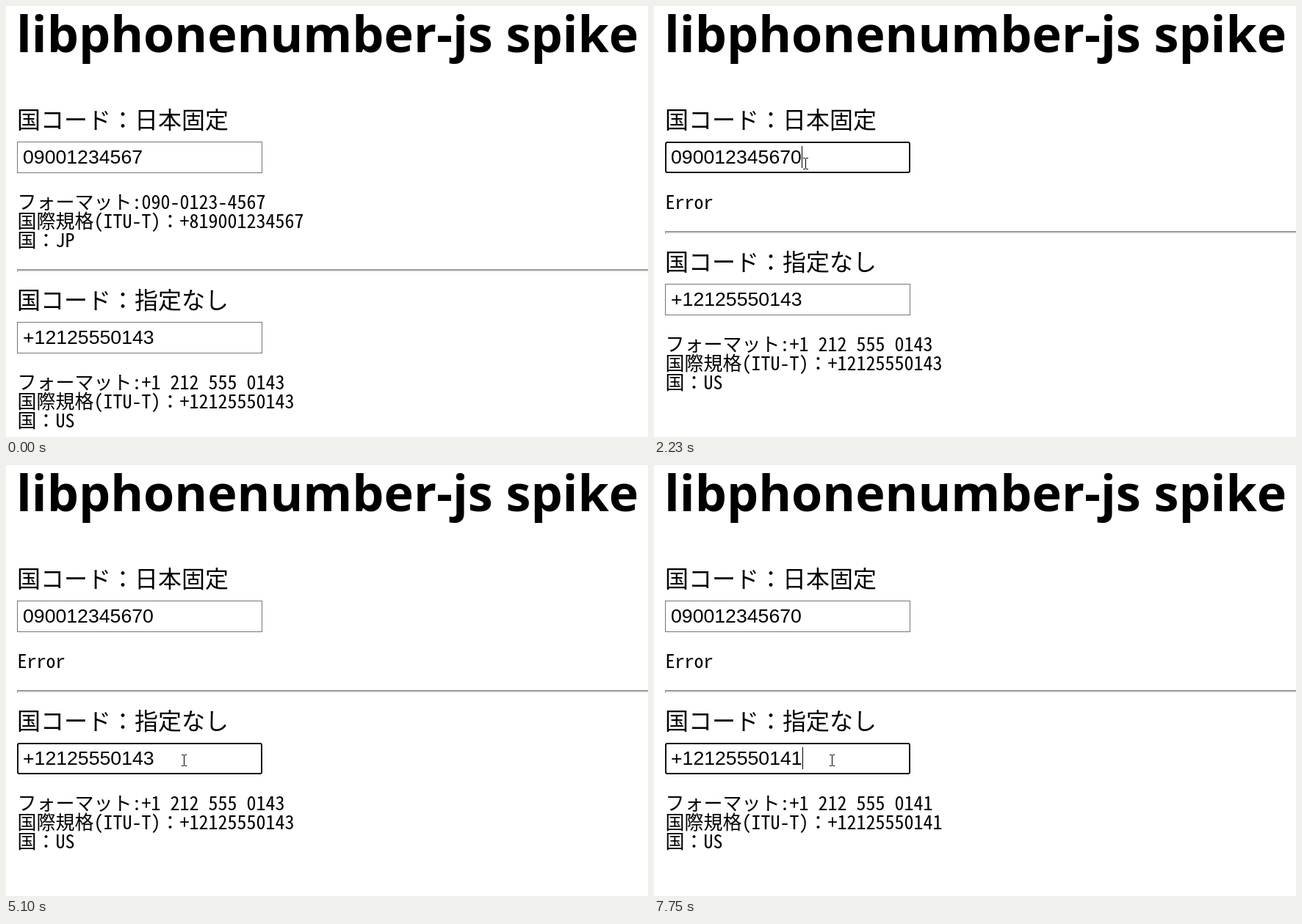
Animation, 874 px wide and 588 px high, one loop 8 s. Source, as an HTML page:

```html
<!DOCTYPE html>
<html lang="ja">
<head>
<meta charset="utf-8">
<title>libphonenumber-js spike</title>
<style>
  html, body { margin: 0; width: 100%; height: 100%; overflow: hidden; background: #fff; }
  svg { display: block; width: 100vw; height: 100vh; }
  text { fill: #000; }
  .title { font: 700 68.3px "Noto Sans", "Open Sans", sans-serif; }
  .label { font: 32px "Noto Sans CJK JP", "Noto Sans CJK", sans-serif; }
  .result { font: 26px "Noto Sans Mono CJK JP", "Noto Sans CJK JP", "Noto Sans CJK", monospace; }
  .value { font: 26.667px "Liberation Sans", Arial, sans-serif; font-kerning: none; }
  .box { fill: #fff; stroke: #767676; }
  .hover .box { stroke: #4f4f4f; }
  .focus .box { display: none; }
  .ring { display: none; fill: #fff; stroke: #101010; stroke-width: 2; }
  .focus .ring { display: inline; }
  .caret { visibility: hidden; shape-rendering: crispEdges; }
  .caret.on { visibility: visible; }
  .beam { fill: none; stroke: #000; shape-rendering: crispEdges; }
  .arrow { fill: #fff; stroke: #000; }
</style>
</head>
<body>
<svg viewBox="0 0 874 588">
  <defs>
    <g id="frame">
      <rect class="box" x="15.5" y="185.5" width="333" height="42"/>
      <rect class="ring" x="16" y="186" width="332" height="41" rx="2"/>
    </g>
  </defs>
  <text class="title" x="14" y="63">libphonenumber-js spike</text>
  <g class="form"></g>
  <g id="rule">
    <path fill="#9a9a9a" d="M15 359H874V361H16V363H15Z"/>
    <path fill="#eee" d="M16 361H874V363H16Z"/>
  </g>
  <g class="form"></g>
  <g id="pointer">
    <path class="beam" d="M-3 -7.5H0M1 -7.5H4M.5 -7V7M-3 7.5H0M1 7.5H4"/>
    <path class="arrow" d="M.5 .5V16.5L4.2 13L6.8 18.5L9.2 17.4L6.7 12H11.7Z"/>
  </g>
</svg>
<script>
const LOOP = 8000;
const LINE = 26;

const fields = [
  {
    label: '国コード：日本固定',
    country: 'JP',
    values: [[0, '09001234567'], [2230, '090012345670']],
    intl: v => '+81' + v.slice(1),
    format: v => v.replace(/(\d{3})(\d{4})(\d{4})/, '$1-$2-$3'),
    valid: v => v.length === 11,
    focus: [1142, 4550],
    caret: [[1142, 1680], [2230, 2780], [3330, 3860]]
  },
  {
    label: '国コード：指定なし',
    country: 'US',
    values: [[0, '+12125550143'], [5330, '+121255501430'], [6430, '+12125550143'],
             [6750, '+1212555014'], [7750, '+12125550141']],
    intl: v => v,
    format: v => v.replace(/(\+1)(\d{3})(\d{3})/, '$1 $2 $3 '),
    valid: v => v.length === 12,
    focus: [4550, LOOP],
    caret: [[4550, 5100], [5330, 5880], [6430, 6990], [7450, LOOP]]
  }
];

const within = (t, [from, to]) => t >= from && t < to;
const latest = (steps, t) => steps.filter(s => s[0] <= t).pop()[1];
const ease = k => k * k * (3 - 2 * k);
const mix = (a, b, k) => a.map((v, i) => Math.round(v + (b[i] - v) * k));
const shift = (node, x, y) => node.setAttribute('transform', `translate(${x} ${y})`);

const rule = document.getElementById('rule');
const pointer = document.getElementById('pointer');
const [beam, arrow] = pointer.children;

document.querySelectorAll('.form').forEach((group, i) => {
  const field = fields[i];
  const rows = [0, 1, 2].map(n => `<text class="result" x="15.5" y="${277 + n * LINE}"></text>`);
  group.innerHTML = `<text class="label" x="15" y="167">${field.label}</text>
    <use href="#frame" visibility="hidden"/>
    <rect class="box" x="15.5" y="185.5" width="333" height="42"/>
    <rect class="ring" x="16" y="186" width="332" height="41" rx="2"/>
    <text class="value" x="23" y="215"></text>
    <rect class="caret" y="191" width="1" height="30"/>${rows.join('')}`;
  group.querySelector('use').remove();
  field.group = group;
  field.value = group.querySelector('.value');
  field.caretNode = group.querySelector('.caret');
  field.rows = [...group.querySelectorAll('.result')];
});
document.querySelector('defs').remove();

function pointerAt(t) {
  if (t < 440) return null;
  if (t < 3480) {
    const k = Math.min(10, Math.floor((t - 440) / 78)) / 10;
    return mix([760, 572], [206, 215], ease(k));
  }
  if (t < 3860) return [214, 214];
  if (t >= 4720) return [242, 403];
  const step = Math.min(9, Math.floor((t - 3860) / 76.6));
  return step <= 4
    ? mix([214, 214], [237, 389], ease((step + 1) / 5))
    : mix([237, 389], [235, 398], (step - 4) / 5);
}

function caretX(value) {
  const plus = value.startsWith('+') ? 1 : 0;
  return Math.round(22.9 + plus * 15.57 + (value.length - plus) * 14.83);
}

function drawField(field, t, top, point) {
  const value = latest(field.values, t);
  const ok = field.valid(value);
  const lines = ok
    ? ['フォーマット:' + field.format(value), '国際規格(ITU-T)：' + field.intl(value), '国：' + field.country]
    : ['Error', '', ''];
  field.rows.forEach((row, i) => { row.textContent = lines[i]; });
  field.value.textContent = value;
  field.caretNode.setAttribute('x', caretX(value));
  field.caretNode.classList.toggle('on', field.caret.some(span => within(t, span)));

  const hover = !!point && within(point[0], [15, 349]) && within(point[1], [185 + top, 228 + top]);
  field.group.classList.toggle('focus', within(t, field.focus));
  field.group.classList.toggle('hover', hover);
  shift(field.group, 0, top);
  return { ok, hover };
}

function draw(t) {
  const point = pointerAt(t);
  const first = drawField(fields[0], t, 0, point);
  const lift = first.ok ? 0 : 2 * LINE;
  shift(rule, 0, -lift);
  const second = drawField(fields[1], t, 246 - lift, point);

  pointer.style.display = point ? '' : 'none';
  if (!point) return;
  const [x, y] = point;
  const overText = first.ok
    ? x < 405 && within(y, [254, 332])
    : x < 303 && within(y, [333, 367]);
  const typing = first.hover || second.hover || overText;
  beam.style.display = typing ? '' : 'none';
  arrow.style.display = typing ? 'none' : '';
  shift(pointer, x, y);
}

const start = performance.now();
function tick() {
  draw((performance.now() - start) % LOOP);
  requestAnimationFrame(tick);
}
tick();
</script>
</body>
</html>
```
